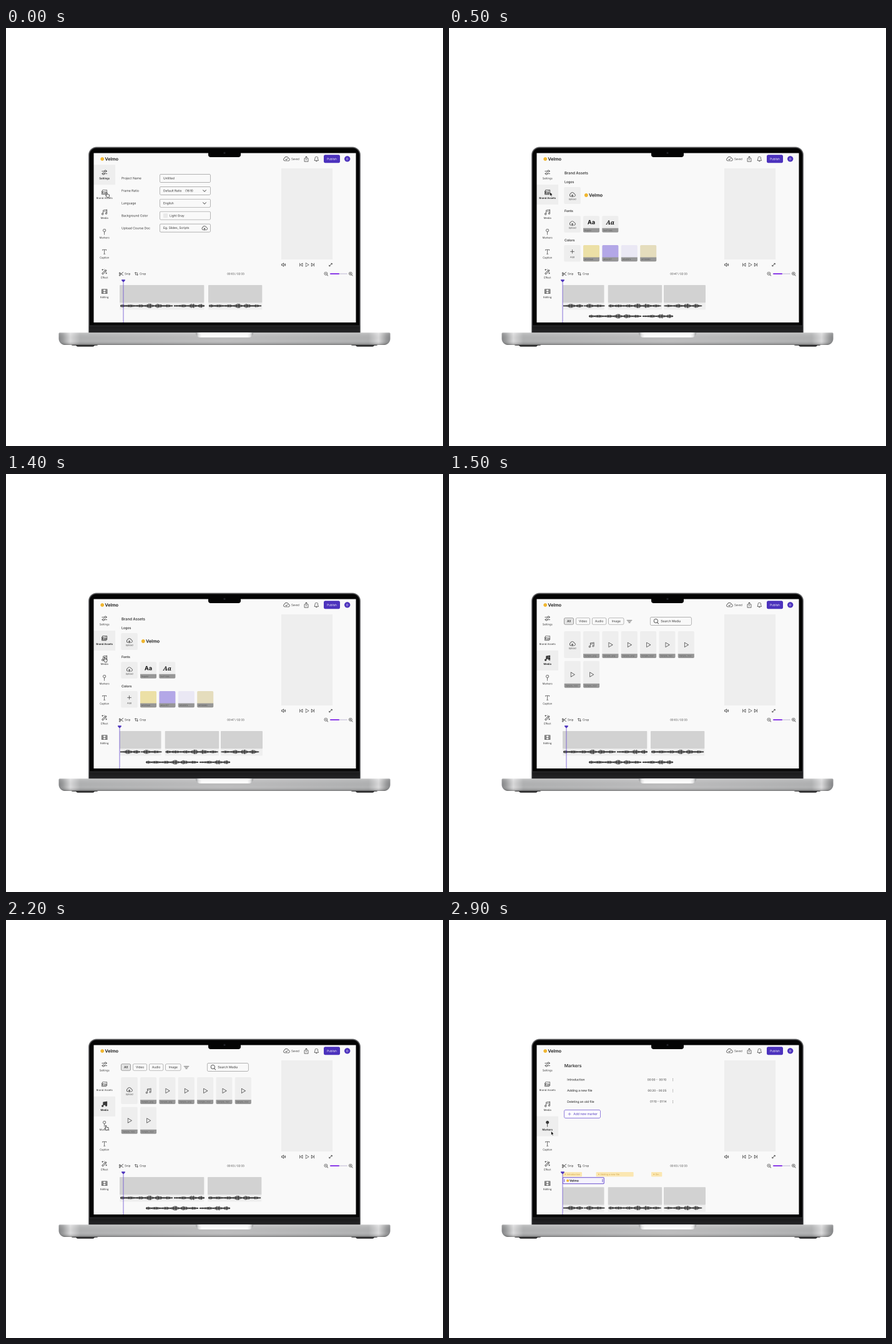
An HTML page with a canvas for the animation above (3 s loop, 700 by 670 pixels).

```html
<!DOCTYPE html>
<html lang="en">
<head>
<meta charset="utf-8">
<title>Video editor tour</title>
<style>
html, body { margin: 0; width: 100%; height: 100%; overflow: hidden; background: #fff; }
canvas { display: block; width: 700px; height: 670px; }
</style>
</head>
<body>
<canvas id="stage" width="1400" height="1340"></canvas>
<script>
const c = document.getElementById('stage').getContext('2d');
c.scale(2, 2); // supersampled, so that the tiny lettering stays clean
c.textRendering = 'geometricPrecision';

const LOOP = 3000;
const INK = '#383838', VIOLET = '#4c32bd', LILAC = '#6a4fd0', TILE = '#eeeeee';
const BRAND = 'Velmo';
const TYPE_SCALE = 1.04;

function box(x, y, w, h, r, fill, line, lw = 0.7) {
  c.beginPath();
  c.roundRect(x, y, w, h, r);
  if (fill) { c.fillStyle = fill; c.fill(); }
  if (line) { c.strokeStyle = line; c.lineWidth = lw; c.stroke(); }
}

function text(s, x, y, size, o = {}) {
  c.font = `${o.style || ''} ${o.weight || 400} ${size * TYPE_SCALE}px ${o.family || 'Inter, "Open Sans", sans-serif'}`;
  c.textAlign = o.align || 'left';
  c.textBaseline = 'alphabetic';
  c.fillStyle = o.color || INK;
  c.fillText(s, x, y + size * 0.35);
}

function icon(d, x, y, o = {}) {
  const p = new Path2D(d);
  c.save();
  c.translate(x, y);
  c.scale(o.scale || 1, o.scale || 1);
  c.lineWidth = o.lw || 0.68;
  c.lineJoin = c.lineCap = 'round';
  if (o.fill) { c.fillStyle = o.fill; c.fill(p); }
  c.strokeStyle = o.line || INK;
  c.stroke(p);
  c.restore();
}

function disc(x, y, r, fill) {
  c.beginPath();
  c.arc(x, y, r, 0, 7);
  c.fillStyle = fill;
  c.fill();
}

const ICON = {
  sliders: 'M-4-2H0M3-2H4M-4 2H-3M0 2H4M0-2a1.5 1.5 0 1 0 3 0a1.5 1.5 0 1 0-3 0M-3 2a1.5 1.5 0 1 0 3 0a1.5 1.5 0 1 0-3 0',
  image: 'M-3-3.5H4V2H-3ZM-4-2V3.5H3M-3 1L-1-1L1 1L2-.2L4 1.5M1.3-2h.8',
  music: 'M-2 2V-3L4-4V1M-2-1.2L4-2.2M-4.2 3a1.2 1.2 0 1 0 2.4 0a1.2 1.2 0 1 0-2.4 0M1.6 2a1.2 1.2 0 1 0 2.4 0a1.2 1.2 0 1 0-2.4 0',
  pin: 'M-2.1-2.5a2.1 2.1 0 1 0 4.2 0a2.1 2.1 0 1 0-4.2 0M0-.3V4.3',
  type: 'M-3-2.3V-3.5H3V-2.3M0-3.5V3.5M-1.2 3.5H1.2',
  wand: 'M-4 3L2-3L3.4-1.6L-2.6 4.4ZM.6-1.6L2-.2M-3-4v2M-4-3h2M3 1.5v2M2 2.5h2M-.5-4v.8',
  film: 'M-4.3-3.4H4.3V3.4H-4.3ZM-2.2-3.4V3.4M2.2-3.4V3.4M-4.3 0H-2.2M2.2 0H4.3M-4.3-1.7h2.1M2.2-1.7h2.1M-4.3 1.7h2.1M2.2 1.7h2.1M-2.2 0H2.2',
  cloud: 'M-2.5 3H2.7A2 2 0 0 0 3-1A3.1 3.1 0 0 0-2.9-1.2A2.2 2.2 0 0 0-2.5 3Z',
  up: 'M0 3.8V.3M-1.2 1.4L0 .2L1.2 1.4',
  tick: 'M-1.3.7L-.3 1.7L1.6-.4',
  share: 'M-1.4-1H-3V4H3V-1H1.4M0 1.7V-4M-1.5-2.6L0-4.1L1.5-2.6',
  bell: 'M-3.3 2.3H3.3C2 1 2.5-.5 2.3-1.5A2.3 2.3 0 0 0-2.3-1.5C-2.5-.5-2 1-3.3 2.3ZM-.9 3.6H.9',
  play: 'M-2.8-3.8L3.6 0L-2.8 3.8Z',
  prev: 'M2.3-2.5V2.5L-1.2 0ZM-2.2-2.5V2.5',
  next: 'M-2.3-2.5V2.5L1.2 0ZM2.2-2.5V2.5',
  sound: 'M-3.3-1H-2L0-2.7V2.7L-2 1H-3.3ZM1.2-1Q2 0 1.2 1M2.3-1.8Q3.8 0 2.3 1.8',
  expand: 'M-2.3 2.3L2.3-2.3M.6-2.3H2.3V-.6M-2.3.6V2.3H-.6',
  lens: 'M-2.8-.4a2.4 2.4 0 1 0 4.8 0a2.4 2.4 0 1 0-4.8 0M1.3 1.4L3 3.1',
  minus: 'M-1.4-.4H.6',
  plus: 'M-3 0H3M0-3V3',
  chevron: 'M-2.6-1.2L0 1.4L2.6-1.2',
  filter: 'M-4-1.9H4M-2.6 0H2.6M-1.2 1.9H1.2',
  snip: 'M-2.5-2a1 1 0 1 0 .1 0M-2.5 1.2a1 1 0 1 0 .1 0M-1.7-.6L3 2.5M-1.7 1.4L3-2.6',
  crop: 'M-1.8-3.2V1.8H3.2M-3.2-1.8H1.8V3.2'
};

const MENU = [
  ['Settings', 'sliders'], ['Brand Assets', 'image'], ['Media', 'music'], ['Markers', 'pin'],
  ['Caption', 'type'], ['Effect', 'wand'], ['Editing', 'film']
];

function ramp(x0, y0, x1, y1, stops) {
  const g = c.createLinearGradient(x0, y0, x1, y1);
  stops.forEach(([p, col]) => g.addColorStop(p, col));
  return g;
}

function foot(x) {
  box(x, 505, 44, 4, [0, 0, 3, 3], '#4a4a4b');
  box(x + 8, 506, 30, 4.8, [0, 0, 3, 3], '#2d2d2e');
}

function laptop() {
  box(132, 190.5, 436, 299, [13, 13, 0, 0], '#77787a');
  box(133, 191.5, 434, 297, [12, 12, 0, 0], '#3a3a3c');
  box(134, 192.5, 432, 296, [11, 11, 0, 0], '#040404');
  c.fillStyle = ramp(0, 476, 0, 489, [[0, '#303032'], [0.25, '#1b1b1c'], [1, '#262628']]);
  c.fillRect(133.5, 476.5, 433, 12);

  foot(104);
  foot(552);
  const base = [84.5, 488.3, 531, 19.7, [2, 2, 10, 10]];
  box(...base, ramp(84.5, 0, 615.5, 0, [
    [0, '#858688'], [0.012, '#9b9c9d'], [0.035, '#dcdcdd'], [0.065, '#b2b3b4'], [0.5, '#c0c0c1'],
    [0.935, '#b2b3b4'], [0.965, '#dcdcdd'], [0.988, '#9b9c9d'], [1, '#858688']
  ]));
  box(...base, ramp(0, 488, 0, 508, [
    [0, 'rgba(255,255,255,.35)'], [0.12, 'rgba(255,255,255,.1)'], [0.7, 'rgba(0,0,0,0)'],
    [0.88, 'rgba(0,0,0,.1)'], [1, 'rgba(0,0,0,.38)']
  ]));
  box(304, 488, 92, 8, [0, 0, 7, 7], ramp(304, 0, 396, 0, [
    [0, '#98999a'], [0.05, '#e4e4e5'], [0.1, '#fafafa'], [0.9, '#fafafa'], [0.95, '#e4e4e5'], [1, '#98999a']
  ]));
  box(140.5, 200.5, 420, 271.5, 0, '#f9f9f9');
  box(324, 198, 52, 9, [0, 0, 3.5, 3.5], '#040404');
  disc(350, 200.3, 1.7, '#18191d');
  disc(350, 200.3, 0.7, '#33363f');
}

function brand(x, y, size) {
  disc(x, y, size * 0.42, '#f0b62f');
  text(BRAND, x + size * 0.6, y, size, { weight: 600, color: '#151515' });
}

function cloud(x, y, mark, scale = 1) {
  icon(ICON.cloud, x, y, { scale });
  icon(ICON[mark], x, y, { scale });
}

function shell(active) {
  brand(154.2, 210, 6.9);
  cloud(449.2, 209.8, 'tick', 1.05);
  text('Saved', 457, 210, 4.2);
  icon(ICON.share, 481, 210);
  icon(ICON.bell, 497.3, 210);
  box(509, 203.3, 26, 13, 2.5, VIOLET);
  text('Publish', 522, 210, 4.4, { color: '#fff', align: 'center' });
  disc(546.7, 209.8, 4.7, VIOLET);
  text('D', 546.7, 209.9, 4.2, { color: '#fff', align: 'center', weight: 500 });

  MENU.forEach(([name, shape], i) => {
    const y = 231.5 + 31.8 * i, on = i === active;
    if (on) c.fillStyle = TILE, c.fillRect(140.5, y - 12.3, 34.5, 32);
    icon(ICON[shape], 157.7, y, { fill: on && i > 1 ? INK : null, lw: on ? 0.85 : 0.68 });
    text(name, 157.7, y + 9.4, 4, { align: 'center', weight: on ? 600 : 400, color: on ? '#1c1c1c' : INK });
  });

  box(441, 225, 82, 146, 0, TILE);
  icon(ICON.sound, 444.8, 379.5);
  icon(ICON.prev, 472.7, 379.5);
  icon(ICON.play, 482.3, 379.5, { scale: 0.78 });
  icon(ICON.next, 491.5, 379.5);
  icon(ICON.expand, 520, 379.5);
  icon(ICON.lens, 512.7, 394);
  icon(ICON.minus, 512.7, 394);
  box(519, 393.2, 28, 1.6, 0.8, '#d2cde0');
  box(519, 393, 15, 2, 1, '#8a3be8');
  icon(ICON.lens, 552.2, 394);
  icon(ICON.plus, 551.8, 393.6, { scale: 0.36, lw: 1.8 });
  icon(ICON.snip, 184.7, 394);
  text('Snip', 190, 394, 4.3);
  icon(ICON.crop, 208.8, 394, { scale: 0.85 });
  text('Crop', 214, 394, 4.3);
}

function settings() {
  const rows = [
    ['Project Name', 'Untitled'], ['Frame Ratio', 'Default Ratio    (16:9)', 'chevron'],
    ['Language', 'English', 'chevron'], ['Background Color', 'Light Gray'],
    ['Upload Course Doc', 'Eg. Slides, Scripts', 'cloud']
  ];
  rows.forEach(([label, value, end], i) => {
    const y = 241 + 19.9 * i, swatch = i === 3;
    text(label, 185, y, 4.8);
    box(246.3, y - 6.5, 81.2, 13, 2, null, '#9a9a9a');
    if (swatch) box(252, y - 3.5, 7, 7, 1, '#e9e9e9');
    text(value, swatch ? 262 : 252, y, 4.7);
    if (end === 'chevron') icon(ICON.chevron, 318, y);
    if (end === 'cloud') cloud(318, y, 'up', 0.95);
  });
}

function uploadTile(x, y, w, h, shape, label) {
  box(x, y, w, h, 2, TILE);
  const m = y + h / 2;
  if (shape === 'plus') icon(ICON.plus, x + w / 2, m - 3);
  else cloud(x + w / 2, m - 1.5, 'up');
  text(label, x + w / 2, m + 6, 3.4, { align: 'center' });
}

function card(x, y, h, fill, caption) {
  box(x, y, 26, h, 2, fill);
  box(x, y + h - 6.8, 26, 6.8, [0, 0, 2, 2], '#969696');
  text(caption, x + 2, y + h - 3.4, 3, { color: '#555' });
}

function assets() {
  const head = { weight: 600 };
  text('Brand Assets', 185, 232.5, 5.7, head);
  text('Logos', 185, 246.8, 5, head);
  uploadTile(184.3, 255, 26.5, 27, 'cloud', 'Upload');
  brand(219.8, 268, 7);
  text('Fonts', 185, 293.3, 5, head);
  uploadTile(184.3, 301.3, 26.5, 26.5, 'cloud', 'Upload');
  card(215, 301.3, 26.3, TILE, 'Regular');
  card(245.3, 301.3, 26.3, TILE, 'Serif Italic');
  text('Aa', 228, 311.6, 8.8, { weight: 700, align: 'center', color: '#111' });
  text('Aa', 258.3, 311.8, 9, { weight: 700, style: 'italic', align: 'center', color: '#111',
    family: '"Noto Serif", "Liberation Serif", serif' });
  text('Colors', 185, 340, 5, head);
  uploadTile(184.3, 348, 26.5, 26.5, 'plus', 'Add');
  ['#ECE0A6', '#B3A7E7', '#EAE8F4', '#E5DDBD'].forEach((col, i) => card(215 + 30.4 * i, 348, 26.3, col, col));
}

function media() {
  [['All', 184.5, 15], ['Video', 203.3, 22.4], ['Audio', 229.3, 22.6], ['Image', 255.5, 24.5]].forEach(([s, x, w], i) => {
    box(x, 230.8, w, 10.4, 2, i ? null : '#e4e4e4', i ? '#999' : '#777');
    text(s, x + w / 2, 236, 4.7, { align: 'center', weight: i ? 400 : 600 });
  });
  icon(ICON.filter, 289, 236.2);
  box(322.3, 229.6, 66, 12.8, 2, null, '#999');
  icon(ICON.lens, 331.8, 236, { scale: 1.3, lw: 0.6 });
  text('Search Media', 339.3, 236, 4.7);
  uploadTile(184.3, 252, 26.5, 43, 'cloud', 'Upload');
  for (let i = 1; i < 9; i++) {
    const row = i > 6 ? 1 : 0, x = 184.7 + 30.35 * (i - 7 * row), y = 252 + 47.7 * row;
    card(x, y, 43, TILE, 'Sample_' + (i < 4 ? '.png' : '.mov'));
    icon(i === 1 ? ICON.music : ICON.play, x + 13.2, y + 21.8, { scale: 0.97 });
  }
}

function markers() {
  text('Markers', 184.7, 233.7, 6.7, { weight: 600 });
  [['Introduction', '00:00 -  00:10'], ['Adding a new file', '00:20 - 00:25'], ['Deleting an old file', '01:10 - 01:14']]
    .forEach(([name, span], i) => {
      const y = 256 + 17.6 * i;
      text(name, 189.3, y, 4.7, { weight: 500 });
      text(span, 348.3, y, 4.4, { align: 'right' });
      for (const d of [-1.8, 0, 1.8]) disc(358.7, y + d, 0.45, '#555');
    });
  box(184.6, 304.6, 57.8, 12.8, 2, '#fdfdff', LILAC);
  icon(ICON.plus, 193, 311, { scale: 0.75, line: VIOLET });
  text('Add new marker', 199.3, 311, 4.8, { color: VIOLET });
}

function wave(x, len, y, seed) {
  let s = seed * 7919 + 17;
  const rnd = () => (s = (s * 16807) % 2147483647) / 2147483647;
  c.fillStyle = '#2e2e2e';
  c.fillRect(x, y - 0.5, len, 1);
  for (let i = 0; i < len; i += 1.3) {
    const burst = 0.5 + 0.5 * Math.sin(i * 0.42 + seed);
    const swell = 0.65 + 0.35 * Math.sin(i * 0.11 + seed * 2);
    const taper = Math.min(1, i / 8 + 0.25, (len - i) / 8 + 0.25);
    const a = 0.7 + (0.6 + 2.9 * burst * swell) * (0.55 + 0.45 * rnd()) * taper;
    c.fillRect(x + i, y - a, 0.9, 2 * a);
  }
}

function clips(list, y) {
  list.forEach(([x, w]) => {
    box(x, y, w, 39.5, 1, '#efefef');
    box(x, y, w, 28.3, 1, '#d2d2d2');
  });
}

function pair(x, y) {
  wave(x, 84, y, 1);
  wave(x + 86, 48.5, y, 2);
}

const SPLIT = [[182, 66.5], [254.7, 86.5], [344, 67]];

function splitTrack(y) {
  clips(SPLIT, y);
  wave(183, 31.5, y + 33.4, 3);
  wave(216, 33, y + 33.4, 4);
  wave(255.5, 84, y + 33.4, 1);
  wave(344.5, 60, y + 33.4, 5);
}

function playhead(x) {
  c.fillStyle = LILAC;
  c.fillRect(x - 0.4, 405, 0.8, 67);
  icon('M-2.5-1.8H2.5V-.5L0 2L-2.5-.5Z', x, 405.3, { fill: VIOLET, line: VIOLET, lw: 0.5 });
}

function chips(t) {
  const fill = t < 2500 ? '#f2dfa6' : '#fbe7b2';
  [[182, 31, 'Introduction'], [235.6, 60, 'Adding a new file'], [324, 17.3, 'De..']].forEach(([x, w, s]) => {
    box(x, 404, w, 7.4, 1, fill);
    disc(x + 4.3, 407.6, 0.9, '#dfb046');
    text(s, x + 6.8, 407.7, 3.6, { color: '#d2a94e' });
  });
}

function timeline(page, t) {
  text((page === 1 ? '00:47' : '00:03') + ' / 02:33', 368, 394, 4.1, { align: 'center' });
  if (page === 1) splitTrack(412);
  else if (page === 3) {
    chips(t);
    box(182.3, 412.8, 66, 9.9, 1.5, '#f5f3fd', LILAC, 1);
    box(184, 415.3, 1, 5, 0.5, LILAC);
    box(245, 415.3, 1.8, 5, 0.5, '#a89be0');
    brand(190.2, 417.8, 4.7);
    splitTrack(428.2);
  } else {
    const x = page ? 323 : 324;
    clips([[182, 135.3], [x, 86.3]], 412);
    pair(183, 445.4);
    wave(x + 1, 83.5, 445.4, 1);
  }
  if (page === 1 || page === 2) pair(224, 462);
  playhead(page % 2 ? 182 : 188);
}

const ARROW = 'M0 0L0 5.8L1.4 4.6L2.4 6.8L3.4 6.3L2.4 4.2L4.2 4Z';
const HAND = 'M-.6-1.6Q0-2.4.6-1.6L.9.8L3.3 1.3Q4.4 1.6 4.1 3L3.4 5.6H.3L-1.8 2.8Q-2 1.8-1 2L-.4 2.4Z';

function cursor(t) {
  // start, end, from x, from y, to x, to y
  const moves = [[800, 1200, 161.7, 263.3, 158, 295.8], [1900, 2200, 159, 292.8, 160, 331.2], [2600, 2900, 160.4, 330.2, 163.6, 338.8]];
  let x = 161.5, y = 265.8;
  const hand = t < 100 || (t >= 1100 && t < 1500) || (t >= 2100 && t < 2400);
  if (t >= 100) {
    const [a, b, x0, y0, x1, y1] = moves[t < 1500 ? 0 : t < 2400 ? 1 : 2];
    const p = Math.max(0, Math.min(1, (t - a) / (b - a))), e = p * p * (3 - 2 * p);
    x = x0 + (x1 - x0) * e;
    y = y0 + (y1 - y0) * e;
  }
  if (hand) icon(HAND, x, y, { fill: '#f4f4f4', line: '#222', lw: 0.65 });
  else icon(ARROW, x, y, { fill: '#111', line: '#fff', lw: 0.4 });
}

const PAGES = [settings, assets, media, markers];

function draw(now) {
  const t = Math.floor((now % LOOP) / 100) * 100;
  const page = t < 100 ? 0 : t < 1500 ? 1 : t < 2400 ? 2 : 3;
  c.fillStyle = '#fff';
  c.fillRect(0, 0, 700, 670);
  laptop();
  shell(page);
  PAGES[page]();
  timeline(page, t);
  cursor(t);
}

let start;
function tick(now) {
  start ??= now;
  draw(now - start);
  requestAnimationFrame(tick);
}
draw(0);
requestAnimationFrame(tick);
</script>
</body>
</html>
```
